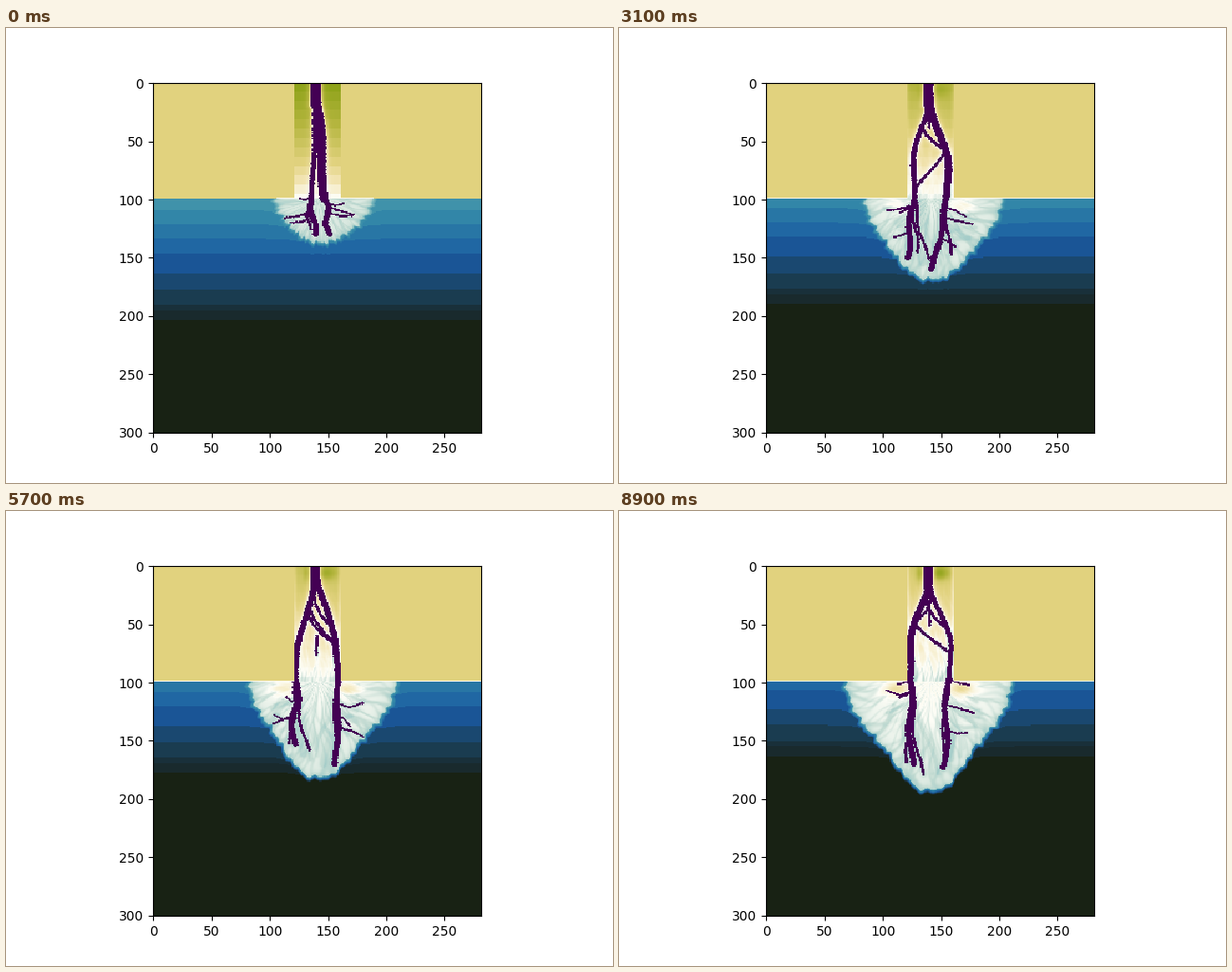
Write a matplotlib script that moves like this. It is 640x480 px and loops after 9000 ms.

```python
import numpy as np
import matplotlib.pyplot as plt
from matplotlib.animation import FuncAnimation

ROWS, COLS, FRAMES = 301, 282, 90
SHORE = 100
CELL = 369.6 / ROWS
LEFT, TOP = 328 - COLS * CELL / 2, 57.6
MOUTH = np.array([328, 179])
rng = np.random.default_rng(4)

# Stage coordinates of every cell centre
row, col = np.mgrid[:ROWS, :COLS]
X = LEFT + (col + 0.5) * CELL
Y = TOP + (row + 0.5) * CELL

sea = row >= SHORE
valley = ~sea & (col > 120) & (col < 161)
theta = np.arctan2(Y - MOUTH[1], X - MOUTH[0])
radius = np.hypot(X - MOUTH[0], Y - MOUTH[1])
rough = rng.uniform(-0.5, 0.3, X.shape)

# Elevation colours, deep water to high ground
RAMP_V = [-10, -9, -8, -7, -6, -5, -4, -3, -2, -1, -0.5, -0.2, 0, 0.5, 1, 2, 3]
RAMP_C = np.array([
    (24, 34, 20), (25, 42, 45), (25, 48, 58), (26, 60, 80), (26, 72, 112),
    (26, 85, 150), (32, 103, 163), (40, 118, 165), (50, 134, 168),
    (64, 146, 170), (130, 188, 190), (197, 220, 211), (253, 253, 246),
    (242, 228, 178), (225, 210, 126), (180, 181, 62), (143, 163, 26)])
WATER = (68, 1, 84)
BANDS = [109.5, 121.7, 133.9, 146.1, 163.2, 177, 190.1, 195, 203.1]

# Delta size in pixels at a few times
TIMES = [0, 14, 39, 57, 89]
WEST = [44, 68, 70, 72, 90]
EAST = [59, 75, 77, 84, 86]
SOUTH = [49, 73, 95, 104, 118]

STREAKS = [(rng.uniform(9, 30), rng.uniform(-0.05, 0.05),
            rng.uniform(0, 6.3), rng.uniform(-0.04, 0.04)) for _ in range(6)]


def smooth(t):
    t = np.clip(t, 0, 1)
    return t * t * (3 - 2 * t)


def front(angle, f):
    """Distance from the river mouth to the delta front."""
    west, east, south = (np.interp(f, TIMES, s) for s in (WEST, EAST, SOUTH))
    side = east + (west - east) * angle / np.pi
    point = np.clip(np.sin(angle), 0, 1) ** (5 + 9 * f / FRAMES)
    dip = 4 * np.sin(2 * angle) ** 2
    return side - dip + (south - (west + east) / 2) * point


def ripple():
    return sum(a * np.sin(k * theta + p) for a, k, p in
               ((1.1, 23, 0.4), (1.0, 41, 2.1), (0.7, 67, 4.0)))


def strand(side, y, f):
    """x of the west (-1) or east (1) river strand; they part with time."""
    reach = np.interp(f, [0, 14, 39, 57], [4, 9, 21, 21] if side < 0 else [7, 16, 20, 22])
    sway = 1.5 * np.sin(y / 15 + side + 0.12 * f) * smooth((y - 60) / 40)
    return 327 + side * reach * smooth((y - 68) / 80) + sway


def link(i, f):
    """Cross channel between the two strands."""
    r = np.random.default_rng([i, (f + 5 * i) // 14])
    y = r.uniform(75, 140) + np.linspace(0, r.uniform(12, 45), 4)
    a, b = r.permutation([0, 1]) if i else (0.5, 0.5)
    w = np.linspace(a, b, 4)
    x = (1 - w) * strand(-1, y, f) + w * strand(1, y, f)
    return 3, np.column_stack([x, y])


def arm(i, f):
    """Delta channel from a strand to near the front."""
    r = np.random.default_rng([20 + i, (f + 4 * i) // 13])
    side = 1 if i % 2 else -1
    angle = np.pi / 2 - side * r.uniform(-0.1, 0.45)
    start = np.array([strand(side, 178, f), 178])
    reach = r.uniform(0.7, 0.92) * front(angle, f)
    end = MOUTH + reach * np.array([np.cos(angle), np.sin(angle)])
    t = np.linspace(0, 1, 8)[:, None]
    path = start + t * (end - start)
    bend = r.uniform(3, 6) * np.sin(np.pi * t[:, 0])
    path[:, 0] += bend * np.sin(5 * t[:, 0] + r.uniform(0, 6) + 0.05 * f)
    return (6 if i < 2 else 3), path


def twig(i, arms, f):
    """Thin side channel leaving an arm."""
    r = np.random.default_rng([50 + i, (f + 3 * i) // 10])
    start = arms[i % 2][1][r.integers(0, 5)]
    out = r.uniform(12, 32) * (1 if i % 2 else -1)
    path = start + np.array([(0, 0), (out / 2, 4), (out, r.uniform(-2, 12))])
    return 2, path


def network(f):
    y = np.linspace(57, 180, 12)
    age = f / (FRAMES - 1)
    widths = {-1: 5 + 2 * age, 1: 9 - 4 * age}
    rivers = [(w, np.column_stack([strand(s, y, f), y])) for s, w in widths.items()]
    rivers.append((9, np.array([(325.5, 57), (325, 82)])))
    arms = [arm(i, f) for i in range(5)]
    return (rivers + arms + [link(i, f) for i in range(4)]
            + [twig(i, arms, f) for i in range(6)])


def span(a, b, origin):
    lo = max(0, int((min(a, b) - 14 - origin) / CELL))
    return slice(lo, int((max(a, b) + 14 - origin) / CELL) + 1)


def river_gap(branches):
    """Distance to the nearest bank, negative in the water."""
    gap = np.full(X.shape, 99.0)
    for width, path in branches:
        for (ax, ay), (bx, by) in zip(path, path[1:]):
            box = span(ay, by, TOP), span(ax, bx, LEFT)
            px, py, dx, dy = X[box] - ax, Y[box] - ay, bx - ax, by - ay
            t = np.clip((px * dx + py * dy) / (dx * dx + dy * dy + 1e-9), 0, 1)
            near = np.hypot(px - t * dx, py - t * dy) - width / 2
            gap[box] = np.minimum(gap[box], near)
    return gap


def streaks(f):
    """Thin wandering lines along the flow, 0 to 1."""
    across = np.where(sea, theta, (X - 328) / 45)
    run = np.where(sea, radius, Y - 179)
    lines = 0
    for k, bend, phase, drift in STREAKS:
        wave = np.sin(k * across + bend * run + phase + drift * f
                      + 1.2 * np.sin(run / 9 + phase))
        lines = lines + np.clip(wave, 0, 1) ** 8
    return np.clip(lines / 2, 0, 1)


def blob(x, y, rx, ry):
    return np.exp(-((X - x) / rx) ** 2 - ((Y - y) / ry) ** 2)


def render(f, trail):
    age = f / (FRAMES - 1)
    gap = river_gap(network(f))
    inside = front(theta, f) + ripple() - radius
    lines = streaks(f)

    # Sea floor in colour bands that climb as time passes
    depth = row + 0.45 * f - 4 * np.exp(-np.abs(inside) / 7)
    depth = depth - 25 * age * (col == COLS - 1)
    ocean = -1.0 - np.searchsorted(BANDS, depth)

    # Delta plain
    plain = -0.12 + 0.18 * age * np.exp(-(radius / 70) ** 2)
    plain = plain + age * (0.7 * blob(293, 188, 13, 7) + 0.8 * blob(360, 188, 12, 7))
    plain = plain - 0.13 * lines - 0.15 * trail
    plain = plain - 0.3 * np.exp(-np.clip(inside, 0, None) / 3)
    mix = np.clip((inside + 3) / 5, 0, 1)
    floor = ocean + (plain - ocean) * mix ** 0.7

    # Valley slope, worn down with time
    slope = np.floor(row / 8) * 8 * (1 - age) + row * age
    high = (1.1 + 1.9 * np.exp(-2.2 * age)) * np.clip(1 - slope / 97, 0, 1)
    high = high + age * (1.7 * blob(336, 66, 11, 7) + blob(317, 66, 4, 10))
    wall = np.clip(np.minimum(X - 303, 352.5 - X) / 4, 0, 1)
    high = high * (1 - 0.6 * age * (1 - wall))
    high = high * (1 - np.exp(-np.clip(gap, 0.3, None) / 2))
    high = high - 0.25 * age * lines * np.clip(row / 60, 0, 1) - 0.1 * trail

    v = np.where(sea, floor, np.where(valley, high, 1.0))
    beach = (row == SHORE - 1) & ~valley
    v = np.where(beach, np.where(inside > 0, 0.1, 0.3 + 0.7 * np.exp(-f / 5) - 0.4 * age), v)

    rgb = np.stack([np.interp(v, RAMP_V, c) for c in RAMP_C.T], axis=-1)
    rgb[(gap + rough < 0) & (valley | (sea & (inside > 2)))] = WATER
    trail = np.maximum(0.96 * trail, np.exp(-np.clip(gap, 0, None) / 1.5))
    return rgb.round().astype(np.uint8), trail


def render_all():
    trail, out = np.zeros(X.shape), []
    for f in range(FRAMES):
        rgb, trail = render(f, trail)
        out.append(rgb)
    return out


pictures = render_all()
fig, ax = plt.subplots(figsize=(6.4, 4.8), dpi=100)
image = ax.imshow(pictures[0], interpolation="nearest")


def update(f):
    image.set_data(pictures[f])
    return [image]


anim = FuncAnimation(fig, update, frames=FRAMES, interval=100, repeat=True)
plt.show()
```
